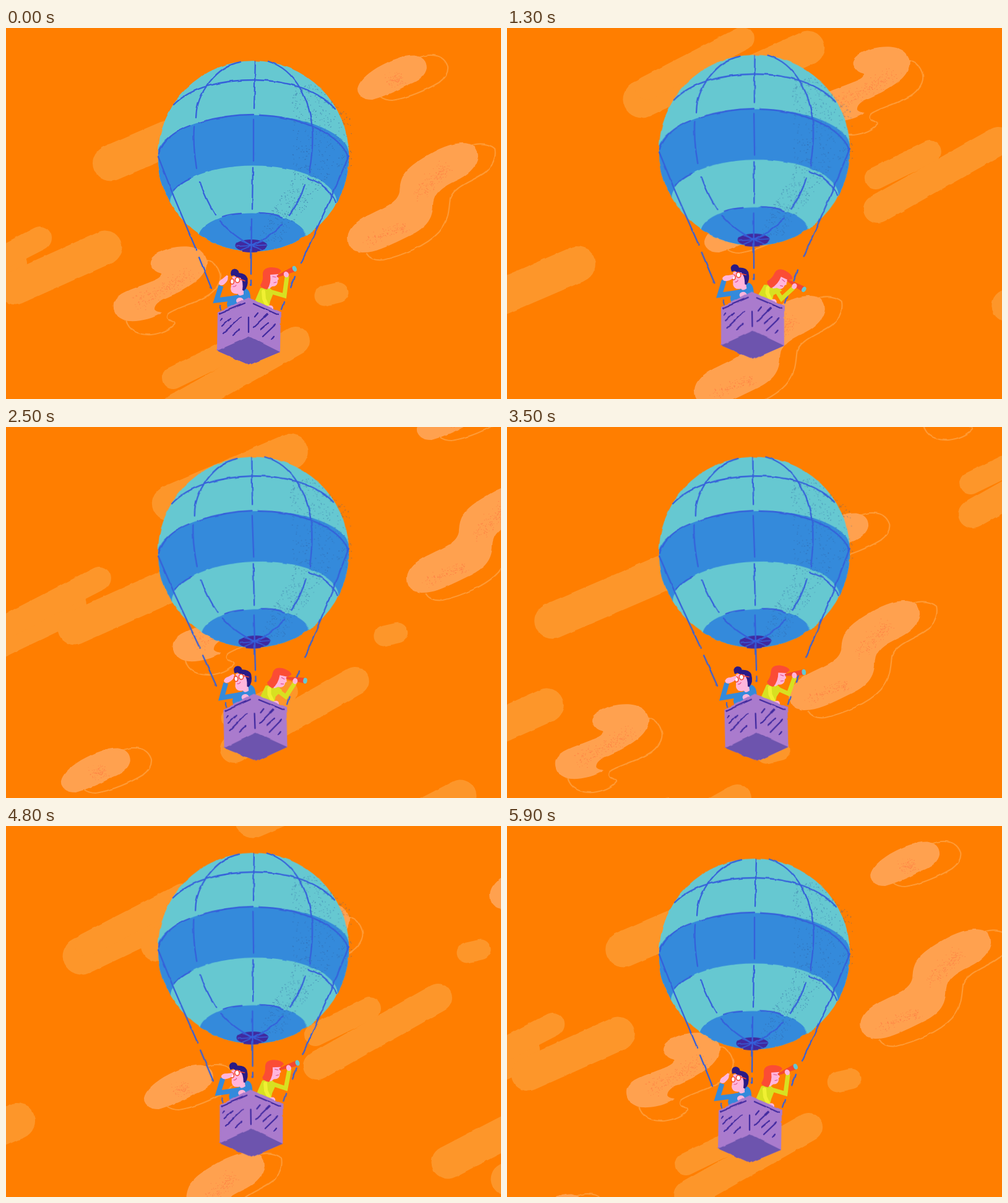
An HTML page that plays this animation: 800x600 px, repeating every 6 s.

```html
<!DOCTYPE html>
<html lang="en">
<head>
<meta charset="utf-8">
<title>Balloon ride</title>
<style>
  html, body { margin: 0; width: 100%; height: 100%; overflow: hidden; background: #ff7e00; }
  svg { display: block; width: 800px; height: 600px; }
  path, line { stroke-linecap: round; stroke-linejoin: round; }
  .flat path { fill: none; stroke: #fd962a; }
  .rim { fill: none; stroke: #fe9a35; stroke-width: 2.2; }
  .puff { fill: #ffa14f; }
  .grain { fill: none; stroke: #ff8445; stroke-width: 1.1; }
  .seams { fill: none; stroke: #3560da; stroke-width: 2.3; }
  .slats { fill: none; stroke: #40299f; stroke-width: 2.3; }
  .skin { fill: #ffb5dc; }
</style>
</head>
<body>
<svg viewBox="0 0 800 600">
  <defs>
    <filter id="rough" filterUnits="userSpaceOnUse" x="-160" y="0" width="1480" height="680" color-interpolation-filters="sRGB">
      <feTurbulence type="fractalNoise" baseFrequency=".07" numOctaves="1" seed="4"/>
      <feDisplacementMap in="SourceGraphic" scale="3.500" xChannelSelector="R" yChannelSelector="G"/>
    </filter>
    <clipPath id="globe"><circle cx="400" cy="207.200" r="154.300"/></clipPath>

    <g id="clouds" filter="url(#rough)">
      <g class="flat">
        <path stroke-width="58" d="M169 218.500L363 135"/>
        <path stroke-width="61" d="M-108 438L5 384"/>
        <path stroke-width="38" d="M-100 420L55 340"/>
        <path stroke-width="55" d="M15 420L160 355"/>
        <path stroke-width="36" d="M270 566L358 523"/>
        <path stroke-width="46" d="M273 616L468 506"/>
        <path stroke-width="33" d="M515 433L537 428"/>
        <path stroke-width="53" d="M1059 202L1213 122M1155 229L1260 175"/>
      </g>
      <path class="rim" d="M605 111Q612 117 625 117C650 113 680 100 700 88Q716 76 714 62Q707 42 682 44Q670 46 662 50"/>
      <path class="rim" d="M751 190Q775 183 790 195Q794 215 775 233C755 248 725 255 718 275C715 300 716 310 700 330C680 352 640 368 610 375Q590 377 583 365"/>
      <path class="rim" d="M194 472C198 490 215 497 235 496C250 494 262 490 272 480Q275 477 268 474Q258 470 262 462C275 452 310 445 330 430C345 418 349 405 345 395Q340 380 325 376"/>
      <path class="puff" d="M568 98Q571 82 600 64Q635 44 660 44.500Q680 47 680 65Q677 82 650 92Q620 108 592 116Q568 116 568 98Z"/>
      <path class="puff" d="M735 186Q763 185 763 208Q760 232 725 248C700 260 690 270 690 290C688 320 665 330 640 342C615 354 595 364 575 363Q552 360 552 338Q554 318 585 303C610 290 632 284 636 265C637 240 645 230 665 216C690 200 710 188 735 186Z"/>
      <path class="puff" d="M234 385C228 372 245 362 265 356C290 350 322 352 325 377C325 400 305 412 285 424C265 436 240 440 240 455Q242 459 252 460C240 470 215 475 200 474C180 472 172 458 174 445C178 428 205 422 225 414C240 408 252 405 251 398Q240 396 234 385Z"/>
      <path class="grain" id="cloudGrain"/>
    </g>
  </defs>

  <rect width="800" height="600" fill="#ff7e00"/>
  <g id="sky">
    <use href="#clouds"/>
    <use href="#clouds" x="575" y="-570"/>
  </g>

  <g id="balloon"><g filter="url(#rough)">
    <circle cx="400" cy="207.200" r="154.300" fill="#66c8d1"/>
    <g clip-path="url(#globe)" fill="#348adb">
      <path d="M245 206A154.500 66 0 0 1 555 208L555 290L535 283A135 61 0 0 0 265 284L245 290Z"/>
      <path d="M311 339A87 39 0 0 1 485 338V370H311Z"/>
    </g>
    <ellipse cx="396.500" cy="352" rx="26" ry="10" fill="#40299f"/>
    <path id="shade" fill="none" stroke="#2f5c9c" stroke-opacity=".55" stroke-width="1.100"/>
    <g class="seams">
      <path d="M271 124C300 95 350 84 402 84C455 85 505 100 532 131"/>
      <path d="M247 203Q258 172 297 158M312 153Q355 140 400 140M410 141C465 143 535 165 553 208"/>
      <path d="M403 53L401 130M400 148V215M399 226L398 293M397 310L396 398M396 408V416"/>
      <path d="M379 55C340 62 308 105 307 145M304 160Q302 190 308 227M314 250Q322 275 338 302M346 312Q365 335 397 352"/>
      <path d="M424 54C470 68 492 120 495 165Q497 195 490 233M483 253Q475 280 458 303M446 318Q425 340 397 352"/>
      <path d="M272 262Q282 249 298 243M488 243Q518 252 533 281M350 305Q362 301 380 300M408 299Q430 299 447 306"/>
      <path stroke-width="1.600" d="M373 353L421 351M380 359L414 345M381 345L413 359"/>
      <path d="M246 208L271 272L308 360M312 371L332 421M345 449L347 455"/>
      <path d="M554 207L525 275L477 380M467 402L460 420M449 443L445 455"/>
    </g></g>

    <g id="man">
      <path fill="#348adb" d="M357 446Q360 432 373 432L387 421Q396 424 395 440L380 452H358Z"/>
      <path d="M368 437L340 440.500L347.500 417" fill="none" stroke="#348adb" stroke-width="8" style="stroke-linecap:butt;stroke-linejoin:miter"/>
      <g id="manHead">
        <path class="skin" d="M366 402L382 400Q387 412 384 424V431Q376 435 375 430Q364 431 363 422Z"/>
        <path fill="#2a1a86" d="M364 401Q361 391 369 389.500Q376 390 376.500 396Q388 397 390.500 405Q392 419 384.500 425L382 424Q384 410 379 404Q372 404 369 400Z"/>
        <g fill="#fff" stroke="#f2472f" stroke-width="1.600">
          <ellipse cx="365.500" cy="410" rx="3" ry="4.200"/><ellipse cx="374" cy="407.500" rx="3.600" ry="4.300"/>
          <path fill="none" d="M378 406L386 409"/>
        </g>
        <path d="M367 418Q370 419 372 416" fill="none" stroke="#e2518c" stroke-width="1.200"/>
      </g>
      <g id="salute"><path class="skin" d="M344 414Q344 408 350 405.500L356.500 400Q360 400 358.500 404Q360 408 352 415Q347 418 344 414Z"/></g>
      <ellipse class="skin" cx="378" cy="441" rx="6" ry="5"/>
    </g>

    <g id="woman">
      <path id="torso" fill="#d8e021"/>
      <path id="sleeve" fill="none" stroke="#f0f032" stroke-width="6"/>
      <g id="womanHead">
        <path class="skin" d="M424 395H440L439.500 403L441 406L439 408Q440 418 430 418L425 422L420 418Z"/>
        <path fill="#fb4c35" d="M415 400Q414 388 428 387Q442 387 445 393L440 398L427 399Q429 413 422 423Q412 421 411 416Q416 408 415 400Z"/>
        <path d="M431 402L436 403M433 412L437 411" fill="none" stroke="#e2518c" stroke-width="1.200"/>
      </g>
      <path id="arm" fill="none" stroke="#d8e021" stroke-width="7" style="stroke-linecap:butt;stroke-linejoin:miter"/>
      <g id="scope">
        <path fill="#f4482f" d="M0 -1.500L12 -3L31 -4.500V4.500L12 3L0 1.500Z"/>
        <ellipse cx="31" cy="0" rx="3.300" ry="4.700" fill="#66c8d1"/>
        <ellipse class="skin" cx="15" cy="3" rx="4" ry="4.800"/>
      </g>
      <ellipse class="skin" cx="427" cy="453" rx="5" ry="4.500"/>
    </g>

    <g filter="url(#rough)">
      <path fill="#aa7bcd" d="M342 460L392 436L444 459L443 524L393 545L341 522Z"/>
      <path fill="#6d54ae" d="M341 522L393 499L443 524L393 545Z"/>
      <path class="slats" d="M345 462L386 445M400 446L440 464M392 468V492M347 473L350 470M349 482L362 470M351 494L380 467M367 496L377 487M402 467L407 461M400 484L422 463M412 487L424 477M415 499L436 479M429 504L433 499"/>
    </g>
  </g>
</svg>
<script>
const $ = id => document.getElementById(id);
const lerp = (a, b, k) => a + (b - a) * k;

let seed = 7;
const rnd = () => (seed = seed * 16807 % 2147483647) / 2147483647;
const bell = () => rnd() + rnd() - 1;

const dots = (count, place) => Array.from({ length: count }, () => {
  const [x, y] = place();
  return `M${x.toFixed(1)} ${y.toFixed(1)}h${(rnd() * .8).toFixed(1)}`;
}).join('');

const streak = (count, x1, y1, x2, y2, spread) => dots(count, () => {
  const k = rnd();
  return [lerp(x1, x2, k) + bell() * spread, lerp(y1, y2, k) + bell() * spread];
});

$('cloudGrain').setAttribute('d',
  streak(80, 620, 86, 638, 80, 12) + streak(150, 668, 268, 712, 225, 14) +
  streak(110, 580, 347, 648, 320, 11) + streak(190, 212, 446, 302, 396, 15));

$('shade').setAttribute('d',
  dots(330, () => {
    const y = 92 + rnd() * 145;
    const right = Math.min(558, 498 + (y - 92) * 1.1);
    return [lerp(463, right, rnd()), y];
  }) +
  dots(270, () => {
    const y = 235 + rnd() * 110, k = (y - 235) / 110;
    return [lerp(465, 402, k) + rnd() * lerp(60, 42, k), y];
  }));

// Smooth looping curve through [seconds, value] keys
const LOOP = 6;
function track(keys, t) {
  const n = keys.length;
  const key = i => {
    const turn = Math.floor(i / n), [s, v] = keys[i - turn * n];
    return [s + turn * LOOP, v];
  };
  const slope = i => {
    const [s0, v0] = key(i - 1), [s1, v1] = key(i + 1);
    return (v1 - v0) / (s1 - s0);
  };
  let i = n - 1;
  while (keys[i][0] > t) i--;
  const [s0, v0] = key(i), [s1, v1] = key(i + 1);
  const d = s1 - s0, k = (t - s0) / d, j = 1 - k;
  return v0 * (1 + 2 * k) * j * j + v1 * (3 - 2 * k) * k * k
    + d * k * j * (slope(i) * j - slope(i + 1) * k);
}

const LOOKOUT = [[0, 0], [.5, .5], [1.3, 1], [2.5, .64], [3.5, .33], [4.8, .1], [5.9, 0]];
const SALUTE = [[0, 0], [.5, .55], [1.3, .9], [2.5, .4], [2.9, .3], [3.5, .75], [4.8, 1], [5.9, 0]];

const move = (id, transform) => $(id).setAttribute('transform', transform);

function draw(t) {
  const drift = t % 3;
  move('sky', `translate(${-575 * drift / 3} ${570 * drift / 3})`);

  const x = 2 * Math.PI * t / 3;
  const rise = 9.4 * (.667 - .5 * Math.cos(x) - .167 * Math.cos(2 * x));
  const tilt = -1.13 * (1 - Math.cos(x / 2));
  move('balloon', `translate(0 ${-rise}) rotate(${tilt} 400 207)`);

  const s = track(SALUTE, t);
  move('salute', `rotate(${34 * s} 346 415)`);
  move('manHead', `rotate(${-8 * s} 380 432)`);

  const p = track(LOOKOUT, t);
  const sx = 438 + 11.5 * p, sy = 402 + 16 * p, turn = -24 + 54 * p;
  move('scope', `translate(${sx} ${sy}) rotate(${turn})`);
  move('womanHead', `translate(${9 * p} ${13 * p}) rotate(${30 * p} 428 406)`);

  const a = turn * Math.PI / 180;
  const hx = sx + 15 * Math.cos(a) - 6 * Math.sin(a);
  const hy = sy + 15 * Math.sin(a) + 6 * Math.cos(a);
  const nx = 8 * p, ny = 8 * p;
  $('torso').setAttribute('d', `M402 442L${411 + p} ${421 + 4 * p}L${424 + nx} ${418 + ny}L${433 + nx} ${427 + ny}L427 442L424 455H408Z`);
  $('sleeve').setAttribute('d', `M${416 + 2 * p} ${426 + 4 * p}L417 438L422 449`);
  $('arm').setAttribute('d', `M${423 + nx} ${425 + ny}L${450 - 10 * p} ${433 + 15 * p}L${hx} ${hy}`);
}

function tick() {
  draw(Math.floor(performance.now() / 100) % 60 / 10);
  requestAnimationFrame(tick);
}
tick();
</script>
</body>
</html>
```
